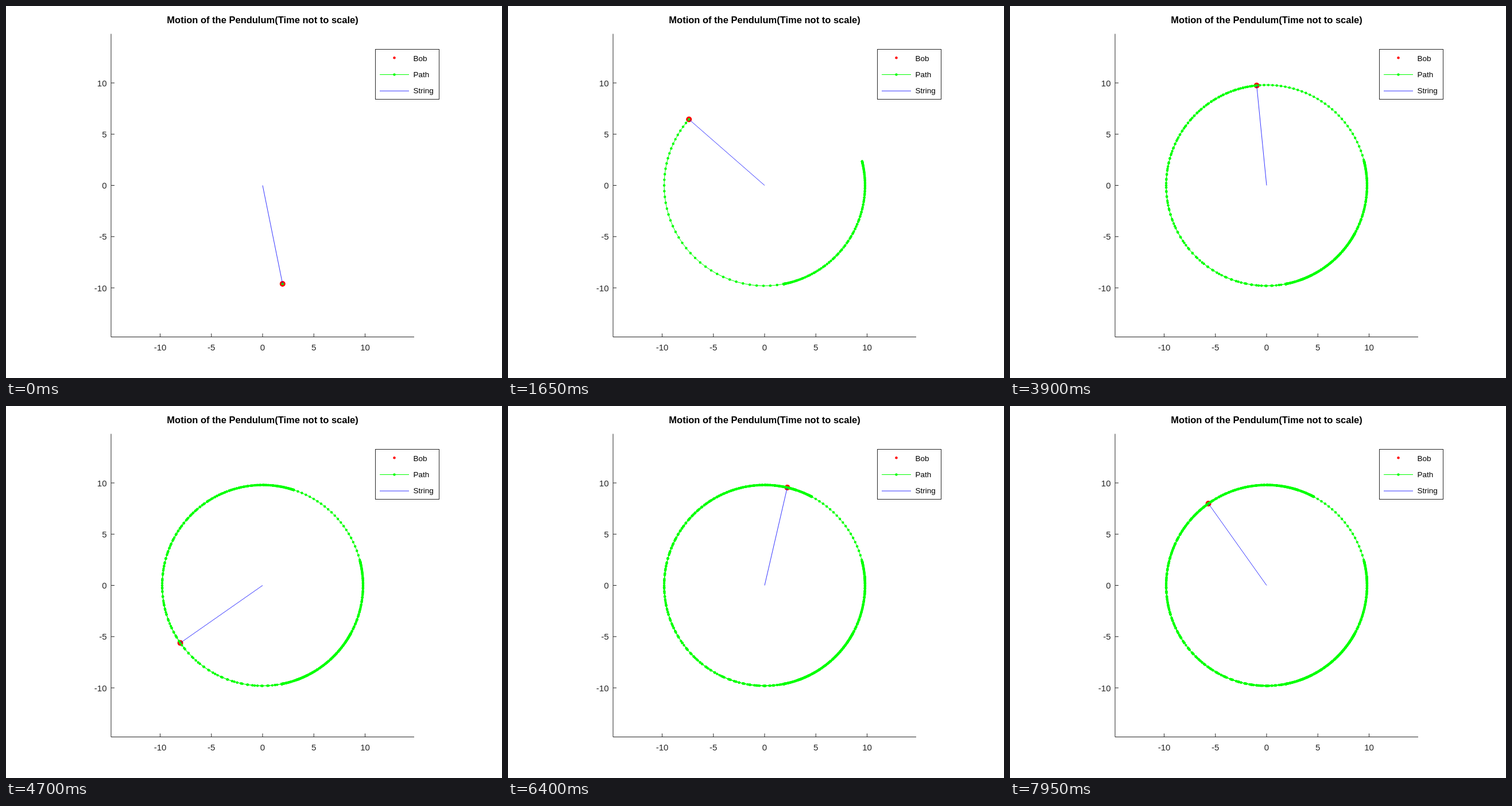
Write an HTML page with a canvas that moves like this. It is 864 px wide and 648 px high and loops after 8000 ms.

```html
<!DOCTYPE html>
<html lang="en">
<head>
<meta charset="utf-8">
<title>Pendulum</title>
<style>
html, body { margin: 0; width: 100%; height: 100%; overflow: hidden; background: #fff; }
canvas { display: block; }
</style>
</head>
<body>
<canvas id="stage" width="864" height="648"></canvas>
<script>
const ctx = document.getElementById('stage').getContext('2d');
const FONT = '"Liberation Sans", Arial, sans-serif';
const RED = '#f00', GREEN = '#0f0', BLUE = '#00f', INK = '#262626';
const LOOP = 8000, FRAME = 50, STEPS_PER_FRAME = 6;
const CX = 447, CY = 312.5, UNIT = 17.85, LENGTH = 9.8;

// Damped, driven pendulum integrated with the Euler-Cromer method.
function simulate(count) {
  const dt = 0.04, damping = 0.5, drive = 1.2, driveRate = 2 / 3;
  const points = [];
  let theta = 0.2, omega = 0, time = 0;
  for (let i = 0; i < count; i++) {
    points.push([CX + UNIT * LENGTH * Math.sin(theta), CY + UNIT * LENGTH * Math.cos(theta)]);
    omega += (-Math.sin(theta) - damping * omega + drive * Math.sin(driveRate * time)) * dt;
    theta += omega * dt;
    time += dt;
  }
  return points;
}
const points = simulate(LOOP / FRAME * STEPS_PER_FRAME);

function line(color, pts, width = 1) {
  ctx.strokeStyle = color;
  ctx.lineWidth = width;
  ctx.beginPath();
  pts.forEach(([x, y]) => ctx.lineTo(x, y));
  ctx.stroke();
}

function dot(color, [x, y], radius = 2.2) {
  ctx.fillStyle = color;
  ctx.beginPath();
  ctx.arc(x, y, radius, 0, 2 * Math.PI);
  ctx.fill();
}

function text(str, x, y, size, align, color = '#000', weight = '') {
  ctx.font = `${weight} ${size}px ${FONT}`;
  ctx.textAlign = align;
  ctx.fillStyle = color;
  ctx.fillText(str, x, y);
}

function drawAxes() {
  text('Motion of the Pendulum(Time not to scale)', CX, 30, 16.5, 'center', '#000', 'bold');
  line(INK, [[183, 48.5], [183, 576.5], [711, 576.5]]);
  for (let v = -10; v <= 10; v += 5) {
    const x = CX + v * UNIT, y = CY - v * UNIT;
    line(INK, [[x, 576.5], [x, 570.5]]);
    line(INK, [[183, y], [189, y]]);
    text(v, x, 600, 15, 'center', INK);
    text(v, 175.5, y + 5.5, 15, 'right', INK);
  }
}

function drawLegend() {
  ctx.strokeStyle = INK;
  ctx.lineWidth = 1;
  ctx.strokeRect(643.5, 75.5, 111, 87);
  dot(RED, [676.5, 90.3]);
  line(GREEN, [[651, 119.5], [702, 119.5]]);
  dot(GREEN, [676.5, 119.5]);
  line(BLUE, [[651, 148], [702, 148]], 0.8);
  ['Bob', 'Path', 'String'].forEach((label, i) => text(label, 709.5, 96 + i * 28.2, 13.5, 'left'));
}

function draw(now) {
  const frame = Math.floor(now % LOOP / FRAME);
  const path = points.slice(0, frame * STEPS_PER_FRAME + 1);
  const bob = path[path.length - 1];
  ctx.fillStyle = '#fff';
  ctx.fillRect(0, 0, 864, 648);
  drawAxes();
  dot(RED, bob, 5);
  line(GREEN, path);
  path.forEach(p => dot(GREEN, p));
  line(BLUE, [[CX, CY], bob], 0.8);
  drawLegend();
}

function tick() {
  draw(performance.now());
  requestAnimationFrame(tick);
}
tick();
</script>
</body>
</html>
```
